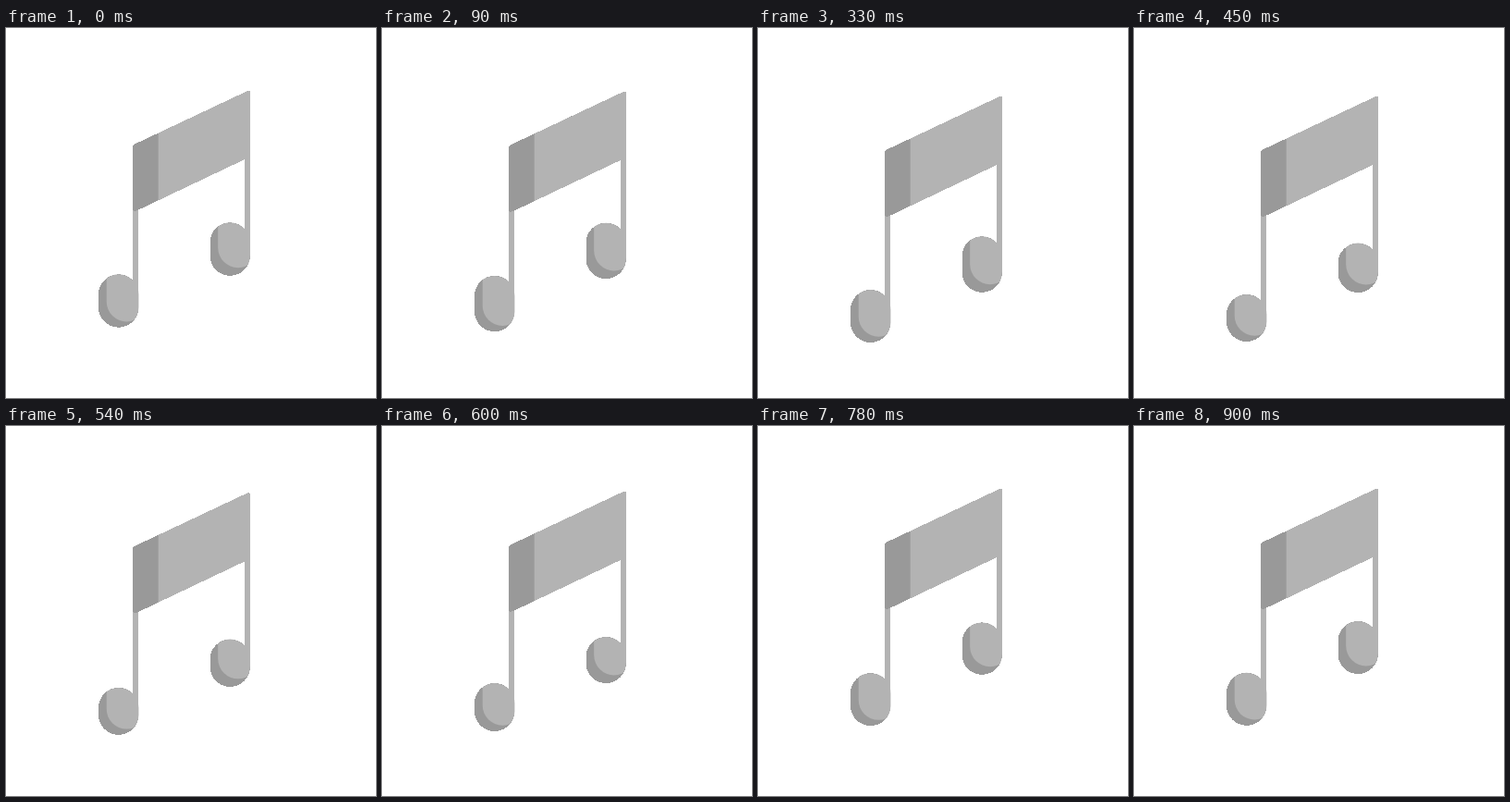
Write an HTML page that moves like this. It is 400x400 px and loops after 0.96 s.

```html
<!DOCTYPE html>
<html lang="en">
<head>
<meta charset="utf-8">
<title>Bouncing note</title>
<style>
  html, body { margin: 0; width: 100%; height: 100%; overflow: hidden; background: #fff; }
  svg { display: block; width: 100vw; height: 100vh; }
  .light { fill: #b3b3b3; }
  .dark { fill: #999; }
  .crisp { shape-rendering: crispEdges; }
</style>
</head>
<body>
<svg viewBox="0 0 400 400">
  <defs>
    <clipPath id="front"><rect x="164.7" y="60" width="110" height="150"/></clipPath>
    <path id="shape" d="M137 128.5Q137 126.5 139 125.6L260.5 68.3Q264 66.8 264 70V139.5L257.5 142.3L141.5 197.4Q137 199 137 195Z"/>
  </defs>
  <g id="notes"></g>
  <g id="beam" class="crisp">
    <use href="#shape" class="dark"/>
    <use href="#shape" class="light" clip-path="url(#front)"/>
  </g>
</svg>
<script>
const LOOP = 960, STEP = 30, LAST = 900, SWAY = 780, R = 21.7;
const times = [0, 180, 330, 450, 600, 780, 900];
const notes = [
  { x: 100, stemX: 137, stemY: 190, stemW: 6.3, lift: 6.3,
    top: [266.3, 271.3, 283, 288, 278, 267.2, 266.8],
    bottom: [323.7, 334.7, 340, 339, 330, 324.1, 323.8] },
  { x: 220.5, stemX: 257.5, stemY: 135, stemW: 6.5, lift: 8.6,
    top: [210.3, 211.6, 225.3, 232.6, 228, 212.4, 211],
    bottom: [267.8, 276.8, 285.8, 286, 278, 268.8, 268] }
];

function add(parent, tag, attrs) {
  const el = document.createElementNS('http://www.w3.org/2000/svg', tag);
  set(el, attrs);
  return parent.appendChild(el);
}

function set(el, attrs) {
  for (const key in attrs) el.setAttribute(key, attrs[key]);
}

// Smooth interpolation that never overshoots the keys.
function sample(keys, t) {
  const slope = i => (keys[i + 1] - keys[i]) / (times[i + 1] - times[i]);
  const tangent = i => {
    if (i === 0 || i === keys.length - 1) return 0;
    const a = slope(i - 1), b = slope(i);
    return a * b > 0 ? 2 * a * b / (a + b) : 0;
  };
  let i = 0;
  while (i < times.length - 2 && t >= times[i + 1]) i++;
  const h = times[i + 1] - times[i], u = (t - times[i]) / h, v = 1 - u;
  return v * v * (1 + 2 * u) * keys[i] + u * u * (3 - 2 * u) * keys[i + 1]
    + h * u * v * (v * tangent(i) - u * tangent(i + 1));
}

const layer = document.getElementById('notes');
const beam = document.getElementById('beam');

notes.forEach((n, i) => {
  const body = { x: n.x, width: 2 * R, rx: R };
  const clip = add(layer, 'clipPath', { id: 'head' + i });
  n.mask = add(clip, 'rect', body);
  n.side = add(layer, 'rect', { ...body, class: 'dark crisp' });
  const group = add(layer, 'g', { 'clip-path': `url(#head${i})` });
  n.face = add(group, 'rect', { ...body, x: n.x + 8.7, class: 'light' });
  n.stem = add(layer, 'rect', { x: n.stemX, width: n.stemW, class: 'light crisp' });
});

function draw(t) {
  const sway = t < SWAY ? 3.2 * (1 - Math.cos(2 * Math.PI * t / SWAY)) : 0;
  beam.setAttribute('transform', `translate(0 ${sway})`);
  for (const n of notes) {
    const top = sample(n.top, t), bottom = sample(n.bottom, t);
    const stemY = n.stemY + sway;
    for (const el of [n.mask, n.side]) set(el, { y: top, height: bottom - top });
    set(n.face, { y: top - 30, height: bottom - n.lift - top + 30 });
    set(n.stem, { y: stemY, height: bottom - R - stemY });
  }
}

const start = performance.now();
function tick() {
  const t = (performance.now() - start) % LOOP;
  draw(Math.min(LAST, Math.floor(t / STEP) * STEP));
  requestAnimationFrame(tick);
}
tick();
</script>
</body>
</html>
```
